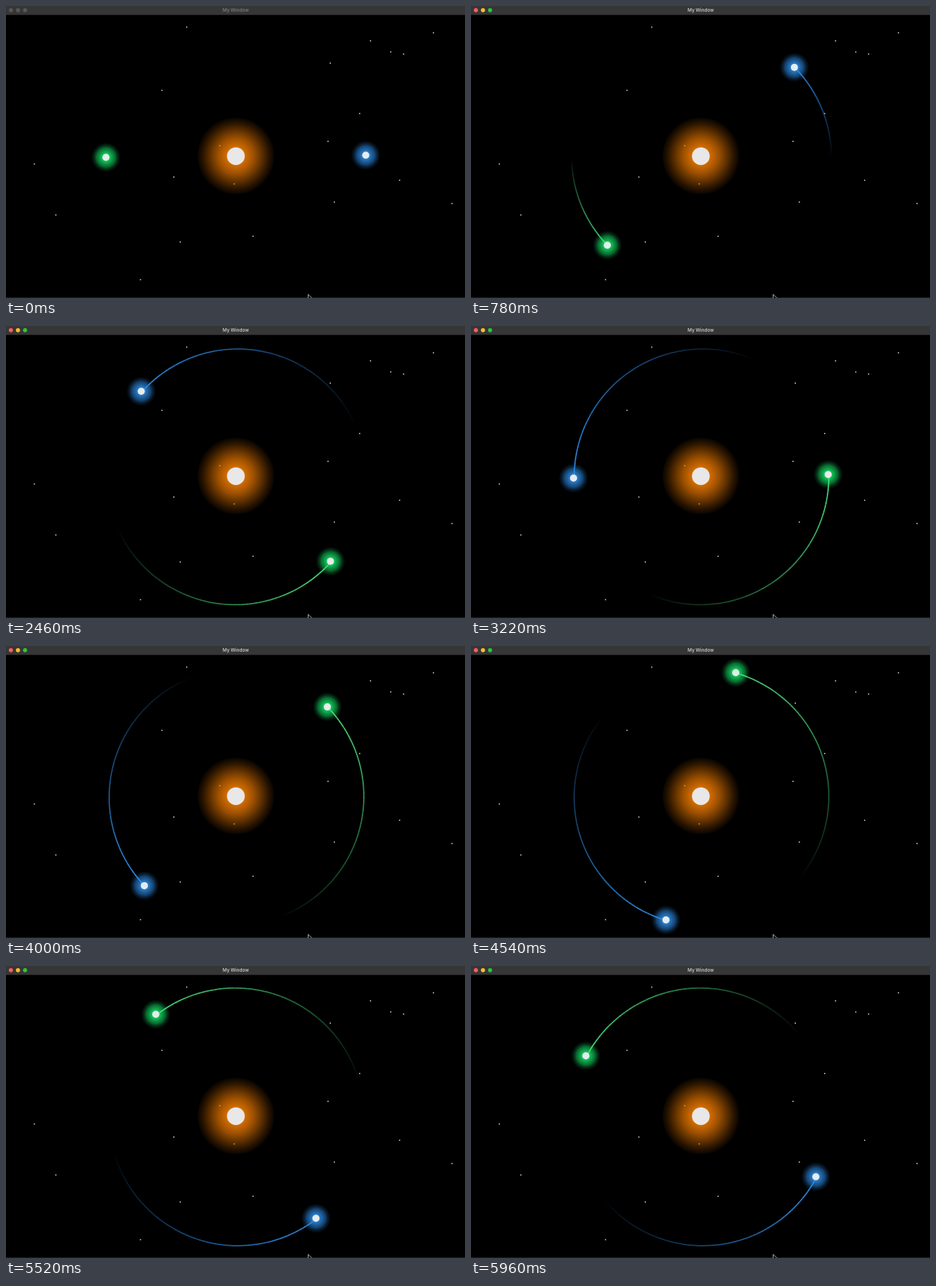
Write an HTML page that moves like this. It is 640 px wide and 408 px high and loops after 5980 ms.

```html
<!DOCTYPE html>
<html lang="en">
<head>
<meta charset="utf-8">
<title>Orbits</title>
<style>
  html, body { margin: 0; width: 100%; height: 100%; overflow: hidden; background: #000; }
  svg { display: block; width: 100vw; height: 100vh; }
  text { font: 600 6.4px Inter, "Open Sans", sans-serif; text-anchor: middle; }
</style>
</head>
<body>
<svg id="stage" viewBox="0 0 640 408">
  <defs>
    <radialGradient id="sunGlow">
      <stop offset="0" stop-color="#e27a04"/>
      <stop offset=".25" stop-color="#ce6a02"/>
      <stop offset=".45" stop-color="#a05200"/>
      <stop offset=".65" stop-color="#663400"/>
      <stop offset=".85" stop-color="#2c1600"/>
      <stop offset="1" stop-color="#080400"/>
    </radialGradient>
    <radialGradient id="blueGlow">
      <stop offset="0" stop-color="#2f8ae0"/>
      <stop offset=".3" stop-color="#2676c2"/>
      <stop offset=".65" stop-color="#184b7c" stop-opacity=".9"/>
      <stop offset="1" stop-color="#0a1e33" stop-opacity=".2"/>
    </radialGradient>
    <radialGradient id="greenGlow">
      <stop offset="0" stop-color="#16d664"/>
      <stop offset=".3" stop-color="#10bc54"/>
      <stop offset=".65" stop-color="#0a7636" stop-opacity=".9"/>
      <stop offset="1" stop-color="#042a12" stop-opacity=".2"/>
    </radialGradient>
  </defs>
  <rect width="640" height="408"/>
  <circle cx="320.5" cy="209.5" r="53.5" fill="url(#sunGlow)"/>
  <circle cx="320.5" cy="209.8" r="12.4" fill="#e8e8e8"/>
  <g id="stars"></g>
  <g id="planets"></g>
  <rect width="640" height="12.5" fill="#363636"/>
  <g id="buttons"></g>
  <text id="title" x="320.3" y="8.1">My Window</text>
  <rect y="407" width="640" height="1" fill="#1c1c1c"/>
  <path d="M421.3 402.8V411L423.3 409L427 408.6Z" fill="#000" stroke="#ddd" stroke-width=".8"/>
</svg>
<script>
const LOOP = 5980, STEP = 20, TRAIL_MS = 2040, SEGMENTS = 60;
const SUN = { x: 320.5, y: 210 };
const ORBIT = { x: 322.3, y: 210.7, r: 179.35 };
const TRAIL_SHIFT = "translate(.9 .8)";
const RAD = Math.PI / 180;
const byId = id => document.getElementById(id);

function add(parent, tag, attrs) {
  const node = document.createElementNS("http://www.w3.org/2000/svg", tag);
  for (const key in attrs) node.setAttribute(key, attrs[key]);
  return parent.appendChild(node);
}

const stars = [
  [252, 29.5], [596, 37.5], [508.3, 48.7], [536.5, 64.2], [554.4, 67.2],
  [452.2, 79.8], [217.5, 117.8], [493.2, 150.3], [449, 189.2], [39.5, 220.7],
  [234, 239], [548.8, 243.5], [457.8, 274], [621.8, 276], [69.5, 292],
  [344.5, 321.7], [243, 329.7], [187.5, 382.4], [298, 195.2], [318.3, 248.6]
];
for (const [x, y] of stars) {
  const nearSun = Math.hypot(x - SUN.x, y - SUN.y) < 53;
  add(byId("stars"), "rect", {
    x: x - .75, y: y - .75, width: 1.5, height: 1.5, fill: nearSun ? "#e0a860" : "#e8e8e8"
  });
}

const buttons = ["#ff5f57", "#febc2e", "#28c840"].map((color, i) => ({
  color, node: add(byId("buttons"), "circle", { cx: 6.8 + i * 9.9, cy: 5.8, r: 2.9 })
}));

// The two planets mirror each other through the sun.
function position(t, side) {
  const base = .7 + .0556 * t;
  const angle = (base + .42 * (1 - Math.cos(base * RAD))) * RAD;
  const x = ORBIT.x + ORBIT.r * Math.cos(angle) - SUN.x;
  const y = ORBIT.y - ORBIT.r * Math.sin(angle) - SUN.y;
  return [SUN.x + side * x, SUN.y + side * y];
}

function makePlanet(side, glow, trailColor) {
  const group = add(byId("planets"), "g", {});
  const halo = add(group, "circle", { r: 20, fill: `url(#${glow})` });
  const line = add(group, "g", {
    transform: TRAIL_SHIFT, stroke: trailColor, "stroke-width": 1.75, fill: "none"
  });
  const trail = Array.from({ length: SEGMENTS }, (_, i) =>
    add(line, "path", { "stroke-opacity": ((i + .5) / SEGMENTS) ** .9 }));
  const core = add(group, "circle", { r: 5, fill: "#e6ecec" });
  return { side, halo, trail, core };
}

const planets = [
  makePlanet(1, "blueGlow", "#2f8ce4"),
  makePlanet(-1, "greenGlow", "#4be07c")
];

function render(t) {
  const active = t >= STEP;
  for (const { color, node } of buttons) node.setAttribute("fill", active ? color : "#575757");
  byId("title").setAttribute("fill", active ? "#c4c4c4" : "#777");

  const start = Math.max(0, t - TRAIL_MS);
  for (const { side, halo, trail, core } of planets) {
    const [x, y] = position(t, side);
    for (const node of [halo, core]) {
      node.setAttribute("cx", x);
      node.setAttribute("cy", y);
    }
    trail.forEach((node, i) => {
      const at = k => position(start + (t - start) * k / SEGMENTS, side).map(v => v.toFixed(2));
      node.setAttribute("d", `M${at(i)}L${at(i + 1)}`);
    });
  }
}

const origin = performance.now();
function tick() {
  const t = (performance.now() - origin) % LOOP;
  render(Math.floor(t / STEP) * STEP);
  requestAnimationFrame(tick);
}
tick();
</script>
</body>
</html>
```
